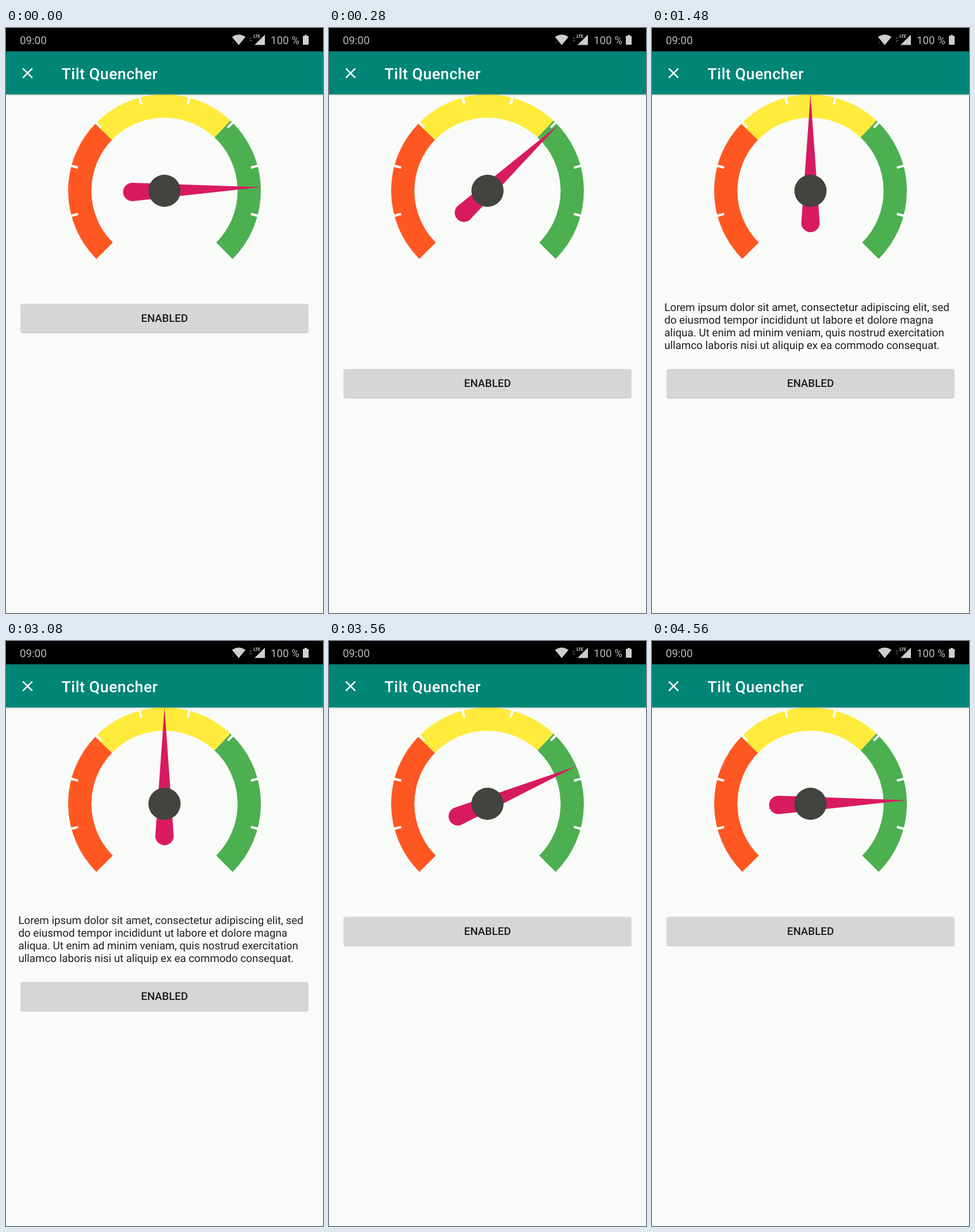
These frames come from a looping animation (551 by 1017 pixels, 7840 ms). An HTML page:

```html
<!DOCTYPE html>
<html lang="en">
<head>
<meta charset="utf-8">
<title>Gauge</title>
<style>
  html, body { margin: 0; width: 100%; height: 100%; overflow: hidden; background: #f9fbf9; }
  svg { display: block; width: 551px; height: 1017px; }
  text { font-family: Roboto, "Noto Sans", sans-serif; font-size: 18.75px; text-rendering: geometricPrecision; }
  .medium { font-weight: 500; }
  #face { filter: drop-shadow(0 1px 1.2px rgba(0, 0, 0, .3)); }
  #bar { filter: drop-shadow(0 1px 1.5px rgba(0, 0, 0, .22)); }
</style>
</head>
<body>
<svg viewBox="0 0 551 1017">
  <rect width="551" height="1017" fill="#f9fbf9"/>

  <g transform="translate(275.5 283)">
    <g id="dial" fill="none"></g>
    <path id="needle" fill="#d81b60" d="M0-167.5L16 56A16 16 0 0 1-16 56Z"/>
    <circle r="28" fill="#434340"/>
  </g>

  <g id="note" fill="#1c1d1c">
    <text x="21.4" y="492">Lorem ipsum dolor sit amet, consectetur adipiscing elit, sed</text>
    <text x="21.4" y="514">do eiusmod tempor incididunt ut labore et dolore magna</text>
    <text x="21.4" y="536">aliqua. Ut enim ad minim veniam, quis nostrud exercitation</text>
    <text x="21.4" y="558">ullamco laboris nisi ut aliquip ex ea commodo consequat.</text>
  </g>

  <g id="button">
    <rect id="face" x="26" y="479.7" width="499" height="49.3" rx="2.2" fill="#d5d6d7"/>
    <text class="medium" x="275.5" y="511.3" text-anchor="middle" fill="#1c1d1c">ENABLED</text>
  </g>

  <rect id="bar" y="40" width="551" height="75.5" fill="#008577"/>
  <path d="M29.3 70.3L45.7 86.7M45.7 70.3L29.3 86.7" stroke="#fff" stroke-width="2.6"/>
  <text class="medium" x="96.5" y="88.6" fill="#fff" style="font-size:26.8px;letter-spacing:.5px">Tilt Quencher</text>

  <rect width="551" height="40.5"/>
  <g fill="#b9b9b9">
    <text x="24" y="27.6">09:00</text>
    <text x="460" y="27.6">100 %</text>
    <path fill="#cecece" d="M404.5 29.8L392.8 15.6Q404.5 7.6 416.2 15.6Z"/>
    <path fill="#cecece" d="M450 11.5V29.5H432Z"/>
    <path fill="#000" d="M429 9H442.5V19.2H429Z"/>
    <text x="430.3" y="17.4" fill="#cecece" style="font-size:7.6px;font-weight:700;letter-spacing:-.3px">LTE</text>
    <path fill="#555" d="M423 18.8L425.6 16L428.2 18.8ZM423 21.2L425.6 24L428.2 21.2ZM393.5 24.2L395 22.6L396.5 24.2ZM393.5 26L395 27.6L396.5 26Z"/>
    <path fill="#cecece" d="M519 12H523V13.8H526V29H516V13.8H519Z"/>
  </g>
</svg>
<script>
const LOOP = 7840, STEP = 40;
const REST = 87.9;      // needle angle with the note hidden
const DROP = 113.2;     // distance the button travels
const STAGE = 250, SWING = 1521;
const OPEN = 20, CLOSE = 3060, LAG = 40;

const $ = id => document.getElementById(id);
const polar = (deg, r) => {
  const a = deg * Math.PI / 180;
  return (r * Math.sin(a)).toFixed(2) + ' ' + (-r * Math.cos(a)).toFixed(2);
};

function stroke(d, color, width) {
  const p = document.createElementNS('http://www.w3.org/2000/svg', 'path');
  p.setAttribute('d', d);
  p.setAttribute('stroke', color);
  p.setAttribute('stroke-width', width);
  $('dial').append(p);
}
const arc = (from, to, color) =>
  stroke(`M${polar(from, 147.3)}A147.3 147.3 0 0 1 ${polar(to, 147.3)}`, color, 40.4);

arc(-135, -45.9, '#ff5722');
arc(-45.9, 43.2, '#ffeb3b');
arc(43.2, 135, '#4caf50');
for (let a = -105; a <= 105; a += 30) {
  stroke(`M${polar(a, 168)}L${polar(a, 155.5)}`, '#fff', 4);
}

const part = (t, start, length) => Math.min(1, Math.max(0, (t - start) / length));
const smooth = u => (1 - Math.cos(u * Math.PI)) / 2;
const settle = u => 1 - (1 - u) ** 4;

function draw(t) {
  const stage = start => smooth(part(t, start, STAGE));
  const shift = stage(OPEN) - stage(CLOSE + STAGE);
  const alpha = stage(OPEN + STAGE) - stage(CLOSE);
  const lift = settle(part(t, OPEN + LAG, SWING)) - settle(part(t, CLOSE + LAG, SWING));
  $('button').setAttribute('transform', `translate(0 ${shift * DROP})`);
  $('note').setAttribute('opacity', alpha);
  $('needle').setAttribute('transform', `rotate(${REST * (1 - lift)})`);
}

const begin = performance.now();
function tick() {
  const t = (performance.now() - begin) % LOOP;
  draw(Math.floor(t / STEP) * STEP);
  requestAnimationFrame(tick);
}
draw(0);
requestAnimationFrame(tick);
</script>
</body>
</html>
```
